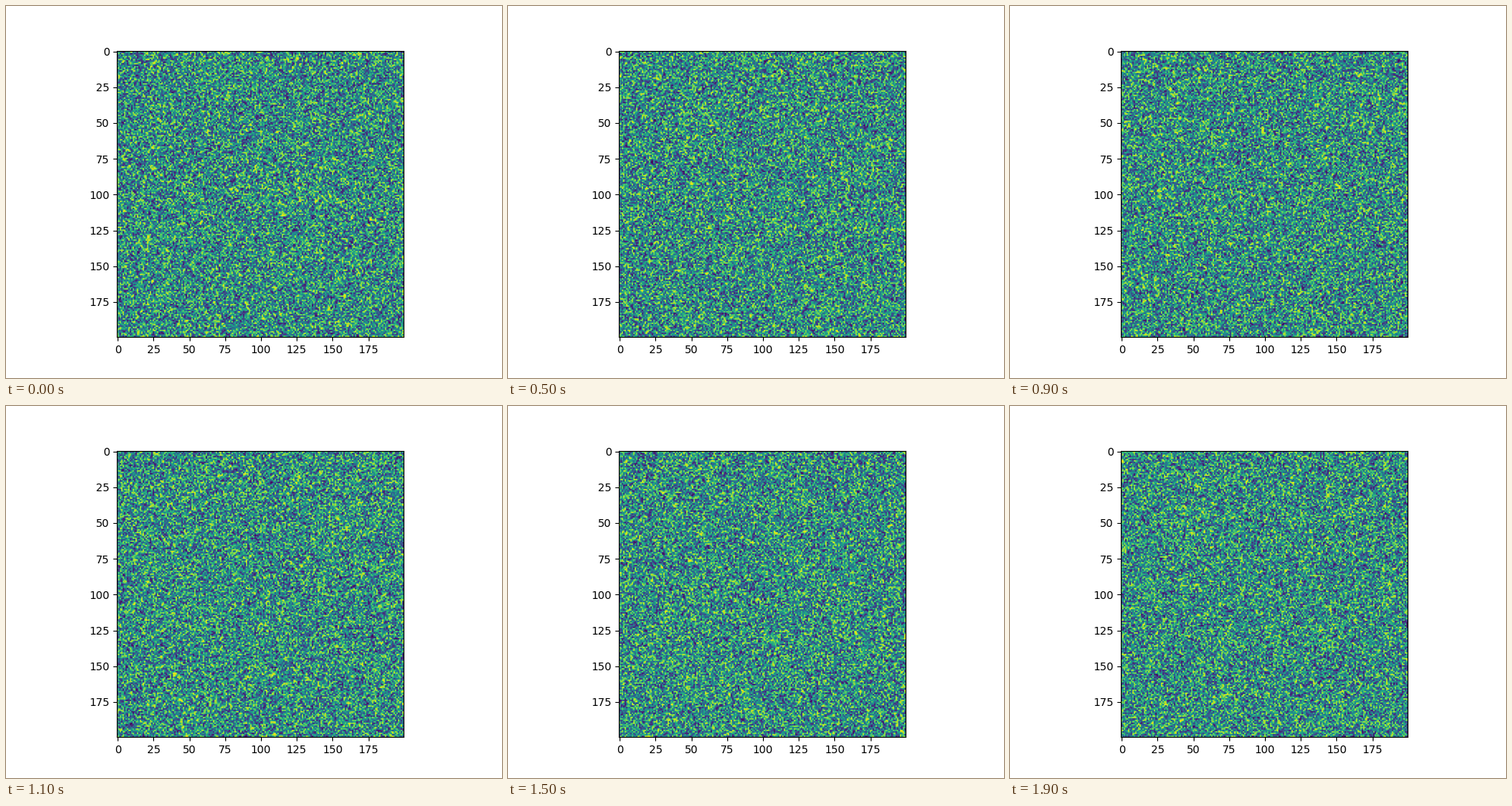
Write a matplotlib script that moves like this. It is 640 by 480 pixels and loops after 2000 ms.

```python
import matplotlib.pyplot as plt
import numpy as np
from matplotlib.animation import FuncAnimation

SIZE = 200
FRAMES = 20
INTERVAL = 100

# One seeded stream of uniform noise, cut into a new field for each step.
np.random.seed(0)
fields = np.random.rand(FRAMES, SIZE, SIZE)

fig, ax = plt.subplots(figsize=(6.4, 4.8), dpi=100)
image = ax.imshow(fields[0], cmap="viridis", vmin=0, vmax=1)


def update(i):
    image.set_data(fields[i])
    return (image,)


anim = FuncAnimation(fig, update, frames=FRAMES, interval=INTERVAL,
                     repeat=True, repeat_delay=0)
plt.show()
```
